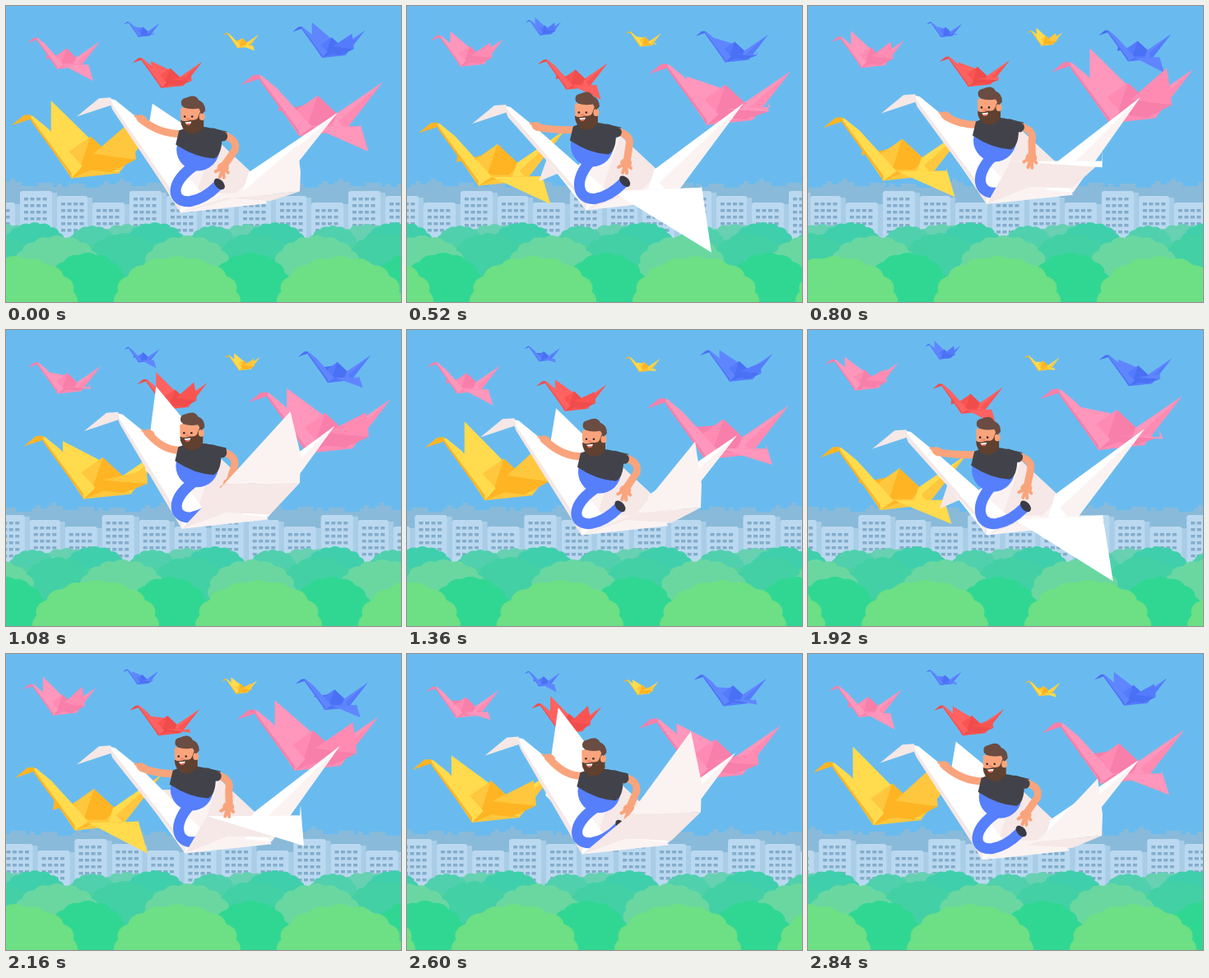
Recreate the animation shown at these times as an HTML page with a canvas. Size 480 px wide and 360 px high, loop 2880 ms.

```html
<!DOCTYPE html>
<html lang="en">
<head>
<meta charset="utf-8">
<title>Paper crane flight</title>
<style>
  html, body { margin: 0; width: 100%; height: 100%; overflow: hidden; background: #69bbef; }
  canvas { display: block; width: 100vw; height: 100vh; }
</style>
</head>
<body>
<canvas id="stage" width="480" height="360"></canvas>
<script>
const ctx = document.getElementById('stage').getContext('2d');
const LOOP = 2880, BEAT = LOOP / 2, STEP = 40;
const mod = (a, n) => ((a % n) + n) % n;
const mix = (a, b, k) => a + (b - a) * k;
// Cosine that reaches 1 at the moment `peak`.
const wave = (t, peak, period = BEAT) => Math.cos(2 * Math.PI * (t - peak) / period);

function poly(color, ...points) {
  ctx.fillStyle = color;
  ctx.beginPath();
  points.forEach(([x, y]) => ctx.lineTo(x, y));
  ctx.closePath();
  ctx.fill();
}

function oval(color, x, y, rx, ry = rx, turn = 0) {
  ctx.fillStyle = color;
  ctx.beginPath();
  ctx.ellipse(x, y, rx, ry, turn, 0, Math.PI * 2);
  ctx.fill();
}

function shape(color, path) {
  ctx.fillStyle = color;
  ctx.fill(new Path2D(path));
}

function line(color, width, path) {
  ctx.strokeStyle = color;
  ctx.lineWidth = width;
  ctx.lineCap = ctx.lineJoin = 'round';
  ctx.stroke(new Path2D(path));
}

// ---- City and trees ----
// Draws a pattern that moves right by `turns` periods in one loop.
function scroll(t, period, turns, start, draw) {
  const first = mod(start + period * turns * t / LOOP, period) - 2 * period;
  for (let x = first; x < 480 + period; x += period) draw(x);
}

function skyline(x) {
  ctx.fillStyle = '#89bad9';
  for (let i = 0; i < 7; i++) {
    const y = 214 + i * 5 % 9;
    ctx.fillRect(x + i * 19, y, 19.5, 70);
    if (i % 3 === 0) ctx.fillRect(x + i * 19 + 5, y - 4, 6, 5);
  }
}

function block(x, y, w) {
  ctx.fillStyle = '#a9cde7';
  ctx.fillRect(x, y + 2, w, 70);
  ctx.fillStyle = '#bad9f0';
  ctx.beginPath();
  ctx.roundRect(x, y, w - 6, 70, 3);
  ctx.fill();
  ctx.fillStyle = '#84accb';
  for (let row = y + 8; row < 275; row += 8)
    for (let col = x + 5; col < x + w - 12; col += 7.5) ctx.fillRect(col, row, 5, 3.5);
}

function city(x) {
  block(x + 45, 231, 43);
  block(x + 88, 239, 45);
  block(x, 225, 45);
}

function bush(color, x, top, half, height) {
  const r = height * .27, lumps = 8;
  oval(color, x, top + height, half - 4, height - 2);
  for (let i = 0; i <= lumps; i++) {
    const a = Math.PI * i / lumps;
    oval(color, x - Math.cos(a) * (half - r * 1.2), top + height - Math.sin(a) * (height - r), r * 1.2, r);
  }
  ctx.fillRect(x - half + 3, top + height, 2 * half - 6, 90);
}

function trees(t) {
  scroll(t, 146, 4, 147, x => bush('#67d1b2', x, 265, 42, 28));
  scroll(t, 146, 4, 35, x => bush('#40cfac', x, 263, 38, 28));
  scroll(t, 146, 4, 105, x => bush('#50d0ad', x, 267, 30, 24));
  ctx.fillStyle = '#4fd2a0';
  ctx.fillRect(0, 290, 480, 70);
  scroll(t, 158, 4, 143, x => bush('#43d0a5', x, 276, 46, 38));
  scroll(t, 158, 4, 62, x => bush('#6ad7a1', x, 279, 54, 40));
  scroll(t, 198, 4, 99, x => bush('#30d793', x, 300, 52, 50));
  scroll(t, 198, 4, 208, x => bush('#6ddf85', x, 304, 77, 54));
}

// ---- Cranes ----
const YELLOW = ['#ffdb4d', '#ffc73d', '#ffb424'];
const PINK = ['#ff96bb', '#ff8bb3', '#f77fa9'];
const RED = ['#ff6260', '#fa5452', '#f04c4c'];
const BLUE = ['#5f86ff', '#547bfc', '#4a70f4'];
const WHITE = ['#ffffff', '#fbf3f2', '#f5e8e6'];

// A bird has moving points (beak, chest, tail, wing corners), a size and three tones.
// Proportions hang on the beak for the head and on the chest for the rest.
const headAt = b => (x, y) => [b.beak[0] + x * b.size, b.beak[1] + y * b.size];
const bodyAt = b => (x, y) => [b.chest[0] + (x - .41) * b.size, b.chest[1] + (y - .345) * b.size];

function craneBody(b) {
  const [light, mid, dark] = b.colors, head = headAt(b), body = bodyAt(b);
  const wingUp = b.back[1] < body(0, .1)[1];
  poly(wingUp ? light : dark, b.back, body(.56, .1), body(.45, .3), body(.27, .12));
  poly(mid, body(.34, .2), body(.54, .06), body(.69, .2), body(.74, .31), b.chest);
  poly(dark, body(.54, .06), body(.69, .2), body(.62, .27), body(.47, .27));
  poly(light, b.tail, body(.67, .19), body(.64, .29), body(.74, .3));
  poly(mid, b.tail, body(.69, .24), body(.74, .3));
  poly(light, head(.12, -.07), head(.147, -.064), head(.25, .02), body(.5, .28), b.chest);
  poly(dark, head(.12, -.07), head(.137, -.025), body(.37, .28), b.chest, body(.41, .31));
  poly(dark, b.beak, head(.085, -.07), head(.13, -.073), head(.135, -.045));
}

function craneWing(b) {
  const [light, mid, dark] = b.colors;
  const notch = [(b.chest[0] + b.keel[0]) / 2, (b.chest[1] + b.keel[1]) / 2 - .035 * b.size];
  poly(dark, b.chest, b.root, b.low, b.keel, notch);
  poly(b.tip[1] > b.rear[1] ? light : mid, b.root, b.tip, b.rear, b.low);
}

// sway and bob: [amount, moment of the peak]; lowest: moment the wings are fully down
const flock = [
  { x: 143, y: 22, size: 43, colors: BLUE, sway: [1, 600], bob: [2, 1100], lowest: 1120 },
  { x: 264, y: 34.5, size: 43, colors: YELLOW, sway: [2, 800], bob: [1.5, 100], lowest: 200 },
  { x: 352, y: 34, size: 88, colors: BLUE, sway: [4, 1400], bob: [3, 600], lowest: 880 },
  { x: 25, y: 44, size: 88, colors: PINK, sway: [4, 600], bob: [2, 1200], lowest: 1400 },
  { x: 155, y: 69, size: 85, colors: RED, sway: [5, 850], bob: [3, 340], lowest: 420 },
  { x: 288, y: 88, size: 172, colors: PINK, sway: [8, 850], bob: [8, 0], lowest: 150 },
  { x: 14, y: 148, size: 178, colors: YELLOW, sway: [8, 1250], bob: [7, 450], lowest: 650 }
];

function smallCrane({ x, y, size, colors, sway, bob, lowest }, t) {
  const beak = [x + sway[0] * wave(t, sway[1], LOOP), y + bob[0] * wave(t, bob[1])];
  const up = .5 - .5 * wave(t, lowest);
  const at = (px, py) => [beak[0] + px * size, beak[1] + py * size];
  const swing = (x0, y0, x1, y1) => at(mix(x0, x1, up), mix(y0, y1, up));
  const bird = {
    size, colors, beak,
    chest: at(.41, .36), tail: at(1, -.02), keel: at(.68, .32),
    back: swing(.26, .23, .27, -.18), root: swing(.5, .31, .56, .19),
    tip: swing(.91, .53, .81, -.04), rear: swing(.84, .29, .84, .12), low: swing(.84, .3, .85, .23)
  };
  craneBody(bird);
  craneWing(bird);
}

function bigCrane(t) {
  const w = peak => wave(t, peak);
  return {
    size: 318, colors: WHITE,
    beak: [86 - 9 * w(360), 134.5 + 11.5 * w(360)],
    chest: [215 + 3 * w(620), 247 + 7 * w(200)],
    tail: [404 + 5 * w(430), 121 + 10 * w(100)],
    back: [172 - 12 * w(480), 142 + 77 * w(430)],
    root: [262 + 18 * w(1400), 215 + 33 * w(230)],
    tip: [358 + 13 * w(430), 201 + 107 * w(430)],
    rear: [358, 193 + 43 * w(310)],
    low: [357, 211 + 29 * w(240)],
    keel: [321, 230 + 9 * w(150)]
  };
}

// ---- Rider ----
const SKIN = '#f9a47c', SHIRT = '#42434a', JEANS = '#567ffc', HAIR = '#6a4c42', BEARD = '#60402f';

function leg([x, y], [tx, ty]) {
  const shoe = [x + 48, y - 35];
  line(JEANS, 13, `M${tx + 10} ${ty + 80} C${x - 18} ${y - 36} ${x - 10} ${y - 11} ${x + 12} ${y - 14}
    Q${x + 29} ${y - 17} ${shoe[0] - 3} ${shoe[1] + 2}`);
  oval('#3a3b44', shoe[0] - 1, shoe[1], 5, 8, -.75);
}

function rightArm(t, [tx, ty]) {
  const hand = [267 - 5 * wave(t, 200), 191 + 7 * wave(t, 160)];
  const [x, y] = [tx + 36, ty + 46], [ex, ey] = [tx + 56, ty + 60];
  line(SKIN, 9, `M${x} ${y} Q${ex + 2} ${ey - 10} ${ex - 2} ${ey + 5} L${hand[0] + 1} ${hand[1] - 2}`);
  oval(SKIN, hand[0], hand[1], 7, 6);
  for (let i = 0; i < 4; i++)
    line(SKIN, 4, `M${hand[0]} ${hand[1]} l${5 * i - 9} ${5 + 8 * Math.sin(i)}`);
  line(SHIRT, 12, `M${x - 9} ${y - 2} L${x + 3} ${y + 2}`);
}

function torso([tx, ty], [bx, by]) {
  const grip = [bx + 76, by + 3], shoulder = [tx - 10, ty + 45];
  line(SKIN, 9, `M${shoulder} Q${(shoulder[0] + grip[0]) / 2} ${shoulder[1] + 1} ${grip[0] + 3} ${grip[1] + 1}`);
  oval(SKIN, grip[0] + 3, grip[1], 7, 5, .4);
  line(SKIN, 3, `M${grip} l-5 -4`);
  ctx.save();
  ctx.translate(tx, ty);
  oval(JEANS, 9, 64, 26, 26);
  shape(SHIRT, 'M-14 41 Q2 34 20 37 L44 42 Q46 48 41 54 L38 52 Q38 70 29 75 Q6 74 -18 58 Z');
  ctx.restore();
}

function head([tx, ty]) {
  ctx.save();
  ctx.translate(tx, ty);
  shape(SKIN, 'M-12 14 Q2 8 14 14 L16 34 Q10 42 0 40 Q-11 37 -12 24 Z');
  shape(BEARD, 'M-12 28 Q-7 31 0 28 Q7 29 9 25 L13 15 L16 24 L16 36 Q11 46 -1 45 Q-12 40 -12 28 Z');
  oval(SKIN, 14, 24, 3.5, 4.5);
  shape(HAIR, 'M-11 10 Q-13 2 -5 1 Q6 -4 10 4 Q18 7 18 17 L14 21 L10 14 Q0 16 -8 13 Z');
  oval('#35282a', -7, 24, 1.3);
  oval('#35282a', 2, 24, 1.3);
  oval('#f28a6c', -3, 27, 2.5, 1.8);
  shape('#ffffff', 'M-7 31 L1 30 Q0 35 -4 34 Z');
  shape('#e65f57', 'M-6 33 L0 32 Q-2 36 -5 34 Z');
  ctx.restore();
}

function hero(t) {
  const beat = t % BEAT, bird = bigCrane(t);
  const top = [220.5 + 4.7 * wave(t, 1290), 105.5 + 6.5 * wave(t, 160)];
  // The raised wing hides the lower leg, then the hand.
  const legInFront = beat < 620 || beat > 1320;
  const handInFront = beat < 860 || beat > 1320;
  craneBody(bird);
  if (legInFront) craneWing(bird);
  leg(bird.chest, top);
  if (!handInFront) rightArm(t, top);
  torso(top, bird.beak);
  if (!legInFront) craneWing(bird);
  if (handInFront) rightArm(t, top);
  head(top);
}

function draw(t) {
  ctx.fillStyle = '#69bbef';
  ctx.fillRect(0, 0, 480, 360);
  scroll(t, 133, 1, 0, skyline);
  scroll(t, 133, 2, 17, city);
  trees(t);
  flock.forEach(bird => smallCrane(bird, t));
  hero(t);
}

const start = performance.now();
function tick() {
  const t = (performance.now() - start) % LOOP;
  draw(Math.floor(t / STEP) * STEP);
  requestAnimationFrame(tick);
}
tick();
</script>
</body>
</html>
```
